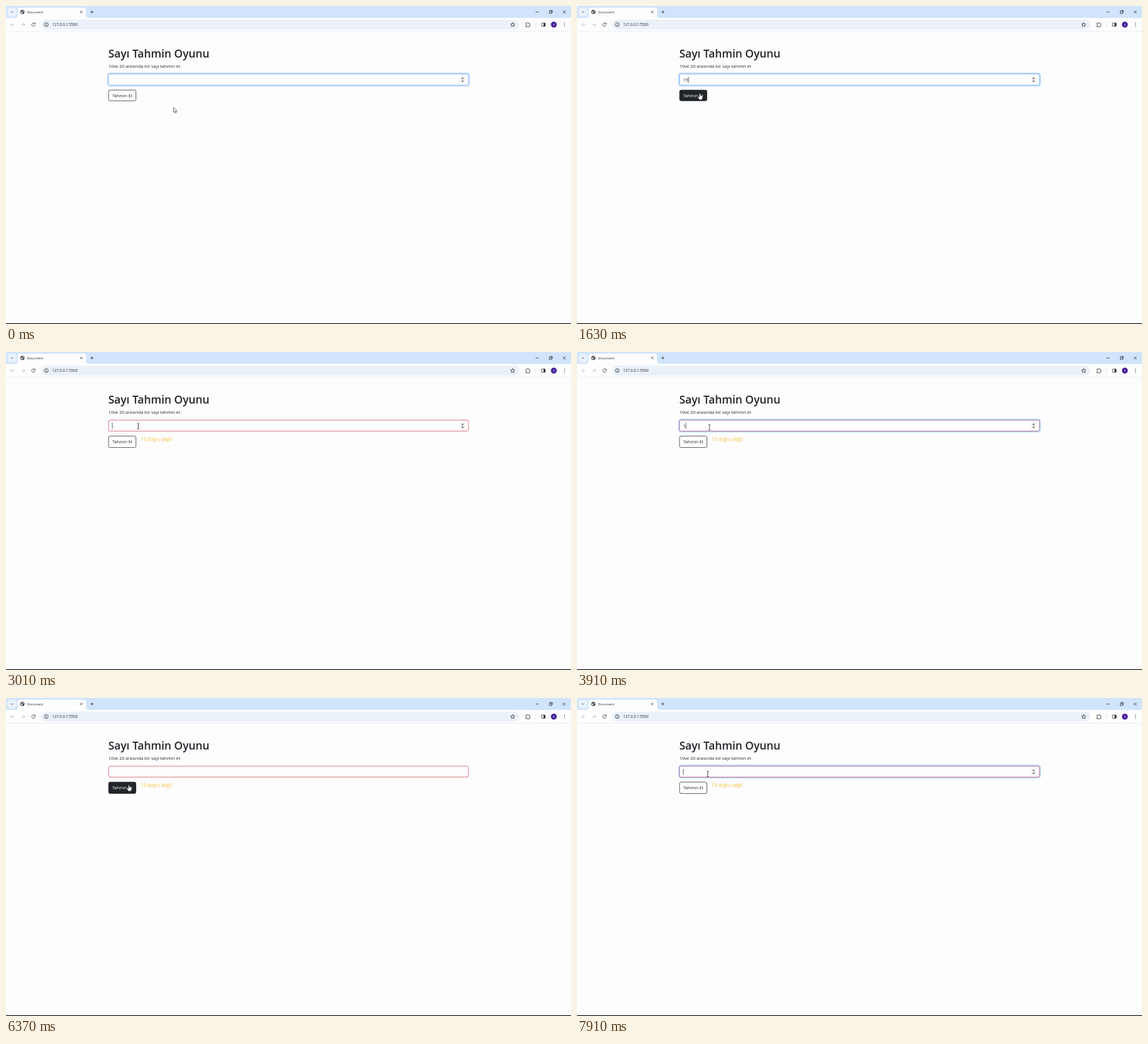
Recreate the animation shown at these times as an HTML page. Size 998 by 561 pixels, loop 8 s.

```html
<!DOCTYPE html>
<html lang="tr">
<head>
<meta charset="utf-8">
<title>Document</title>
<style>
  html, body { margin: 0; width: 100%; height: 100%; overflow: hidden; background: #fdfdfe; }
  svg { display: block; width: 100vw; height: 100vh; }
  text { font-family: "Open Sans", "Noto Sans", sans-serif; fill: #212529; white-space: pre; }
  .line { fill: none; stroke: #30343a; stroke-width: .9; }
  .dim { stroke: #b4b7bc; }
</style>
</head>
<body>
<svg viewBox="0 0 998 561" preserveAspectRatio="none">
  <rect width="998" height="561" fill="#fdfdfe"/>

  <!-- tab strip -->
  <rect width="998" height="21" fill="#d0e4fb"/>
  <rect x="2.5" y="3" width="16" height="15.5" rx="5" fill="#e9f2fe"/>
  <path class="line" d="M8.6 9.7l1.9 1.9 1.9-1.9" stroke-width="1.1"/>
  <path d="M16 21q4.500 0 4.500-4.500V7.500q0-4.500 4.500-4.500H137q4.500 0 4.500 4.500V16.500q0 4.500 4.500 4.500z" fill="#fdfdfe"/>
  <circle cx="29" cy="10.500" r="3.700" fill="#43474c"/>
  <path d="M26.300 9.300l2 .6 1.200 1.300-.8 2.200-1.700-1.200zM29.200 7.700l2.100.8.4 1.500-1.800-.2z" fill="#e8eaed"/>
  <text x="37.300" y="12.900" font-size="5.850">Document</text>
  <path class="line" d="M130.900 8.600l4 4m0-4l-4 4M149 10.500h5.400m-2.700-2.700v5.400" stroke-width="1"/>
  <path class="line" d="M935.500 10.700h5.500M983.500 8.100l5 5m0-5l-5 5M959.700 9.200h4v4h-4zM961 9v-1.200h4v4h-1.200"/>

  <!-- toolbar -->
  <rect y="44.300" width="998" height=".8" fill="#e3e9f1"/>
  <rect x="62" y="24" width="845" height="17.500" rx="8.750" fill="#ebf1f8"/>
  <path class="line dim" d="M14.700 33H8.500m2.800-2.900L8.400 33l2.900 2.900M27 33h6.200m-2.800-2.900l2.900 2.900-2.900 2.900"/>
  <path class="line" d="M51.300 31.400a3 3 0 1 0 .2 2.300M51.700 29.700v2.200h-2.300" stroke-width="1.100"/>
  <circle class="line" cx="71.200" cy="32.800" r="3.400"/>
  <path class="line" d="M71.200 32.300v2.400M71.200 30.700v.9"/>
  <text x="81.700" y="35.300" font-size="6.600">127.0.0.1:5500</text>
  <path id="star" class="line"/>
  <path class="line" d="M918.300 30.300h2a1.200 1.200 0 0 1 2.400 0h1.900v2.200a1.200 1.200 0 0 1 0 2.400v1.800h-6.300v-1.900a1.200 1.200 0 0 0 0-2.400z"/>
  <path d="M935.300 29v8" stroke="#cfe0f5" stroke-width=".9"/>
  <rect class="line" x="946" y="30" width="6.400" height="5.800" rx=".5"/>
  <rect x="949.500" y="30" width="3" height="5.800" fill="#30343a"/>
  <circle cx="967.700" cy="32.800" r="5.200" fill="#45209a"/>
  <text x="967.700" y="34.600" font-size="5" text-anchor="middle" style="fill:#e6def8">R</text>
  <path d="M986.500 30.200v.01m0 2.600v.01m0 2.600v.01" stroke="#30343a" stroke-width="1.400" stroke-linecap="round"/>

  <!-- page -->
  <text x="180.700" y="91" font-size="19.300" font-weight="600">Sayı Tahmin Oyunu</text>
  <text x="181" y="108.500" font-size="7.820">10ve 20 arasında bir sayı tahmin et</text>
  <rect id="ring" x="180" y="119" width="638" height="21.700" rx="3.800" fill="none" stroke="#b4d4fe" stroke-width="2.300"/>
  <rect id="field" x="181.200" y="120.200" width="635.700" height="19.300" rx="2.800" fill="#fdfdfe" stroke-width=".8"/>
  <text id="value" x="187.600" y="133.100" font-size="7.820"></text>
  <path id="caret" d="M0 125v10.300" stroke="#212529" stroke-width=".8"/>
  <g id="spinner">
    <rect x="802.500" y="124.500" width="8" height="11" fill="#efeff0"/>
    <path d="M804.500 128.500l2-2.400 2 2.400zM804.500 131.800l2 2.400 2-2.400z" fill="#4a4a4a"/>
  </g>
  <rect id="button" x="181.200" y="148.300" width="48.300" rx="2.800" stroke="#212529" stroke-width=".8"/>
  <text id="label" x="187.700" font-size="7.700">Tahmin Et</text>
  <text id="message" x="238.300" y="157.400" font-size="8.100" style="fill:#f5bf35"></text>
  <rect y="559.700" width="998" height="1.300" fill="#0b0b0c"/>

  <!-- pointers, hot spot at the origin -->
  <g stroke-linejoin="round" stroke="#222" stroke-width=".7">
    <path id="arrow" d="M0 0v8.600l2-1.800 1.400 3.100 1.400-.6-1.400-3h2.700z" fill="#fff"/>
    <path id="hand" d="M-1 .7q1-1.300 1.900 0v3.200l3.100.7q1.300.4 1.200 1.600l-.7 3-.8 2H-.9L-3.600 7.200q-.3-1.500 1-1.300L-1 7z" fill="#fff"/>
    <path id="ibeam" d="M-1.800-4.800H-.4L0-4.400.4-4.800H1.800M0-4.400V4.400M-1.800 4.800H-.4L0 4.400.4 4.800H1.800" fill="none" stroke-width=".9"/>
  </g>
</svg>
<script>
const LOOP = 8000, FADE = 150, BLINK = 520;
const $ = id => document.getElementById(id);
const set = (id, attrs) => { for (const k in attrs) $(id).setAttribute(k, attrs[k]); };
const show = (id, on) => set(id, { visibility: on ? 'visible' : 'hidden' });

// time, x, y of the pointer's hot spot
const path = [
  [0, 296, 179], [40, 296, 179], [400, 294, 168], [860, 285, 150], [1420, 219, 154],
  [1630, 217, 154], [1850, 215.500, 154.500], [2490, 215.500, 154.500], [2900, 233, 131],
  [3300, 236, 131], [3530, 234, 133], [4420, 234, 133], [5000, 216.500, 154],
  [5200, 215.500, 154.500], [5890, 217, 153], [6370, 217, 153], [6760, 228, 133],
  [7180, 229, 133], [7610, 231, 134]
];
const values = [[0, ''], [1000, '1'], [1200, '15'], [2160, ''], [3870, '1'], [4430, '19'], [5520, '']];
const messages = [[0, ''], [2160, '15 doğru değil'], [5520, '19 doğru değil']];
const focusSpans = [[-FADE, 2060], [3010, 5390], [6870, LOOP]];
const caretResets = [[-BLINK], [1000], [1200], [3010], [3870], [4430], [6870]];

const latest = (list, t) => list.filter(e => e[0] <= t).pop();

function pointerAt(t) {
  const i = path.findIndex(p => p[0] > t);
  if (i < 0) return path[path.length - 1].slice(1);
  if (i === 0) return path[0].slice(1);
  const [a, b] = [path[i - 1], path[i]];
  const u = (t - a[0]) / (b[0] - a[0]), s = u * u * (3 - 2 * u);
  return [a[1] + (b[1] - a[1]) * s, a[2] + (b[2] - a[2]) * s];
}

const overX = (x, y, l, t, r, b) => x >= l && x <= r && y >= t && y <= b;
const kindAt = ([x, y]) =>
  overX(x, y, 181, 148, 230, 168) ? 'hand' :
  overX(x, y, 181, 120, 817, 140) ? 'ibeam' : 'arrow';

const focused = t => focusSpans.some(([a, b]) => t >= a && t < b);
const hovered = t => kindAt(pointerAt(t)) === 'hand';

// Share of the last FADE ms in which the state held, eased.
function fade(state, t) {
  let n = 0;
  for (let i = 0; i < 15; i++) n += state(t - i * FADE / 15);
  const u = n / 15;
  return u * u * (3 - 2 * u);
}

const mix = (a, b, u) => `rgb(${a.map((v, i) => Math.round(v + (b[i] - v) * u))})`;
const PAPER = [253, 253, 254], INK = [33, 37, 41], BLUE = [134, 183, 254];

function draw(t) {
  const value = latest(values, t)[1], message = latest(messages, t)[1];
  const focus = fade(focused, t), hover = fade(hovered, t);

  set('ring', { opacity: focus });
  const wrong = [212, 74, 84], wrongFocus = [184, 76, 112];
  set('field', { stroke: message ? mix(wrong, wrongFocus, focus) : mix([222, 226, 230], BLUE, focus) });
  $('value').textContent = value;
  show('spinner', focused(t) || kindAt(pointerAt(t)) === 'ibeam');

  const blinkOn = Math.floor((t - latest(caretResets, t)[0]) / BLINK) % 2 === 0;
  show('caret', focused(t) && blinkOn);
  set('caret', { transform: `translate(${187.800 + value.length * 4.550})` });

  set('button', { height: message ? 20.200 : 19, fill: mix(PAPER, INK, hover) });
  set('label', { y: message ? 161.300 : 160.700 });
  $('label').style.fill = mix(INK, [255, 255, 255], hover);
  $('message').textContent = message;

  const pos = pointerAt(t), kind = kindAt(pos);
  for (const id of ['arrow', 'hand', 'ibeam']) show(id, id === kind);
  set(kind, { transform: `translate(${pos})` });
}

const star = Array.from({ length: 10 }, (_, i) => {
  const a = i * Math.PI / 5, r = i % 2 ? 1.800 : 4;
  return `${(895 + r * Math.sin(a)).toFixed(2)} ${(33 - r * Math.cos(a)).toFixed(2)}`;
});
set('star', { d: `M${star.join('L')}z` });

const start = performance.now();
function tick() {
  draw((performance.now() - start) % LOOP);
  requestAnimationFrame(tick);
}
tick();
</script>
</body>
</html>
```
